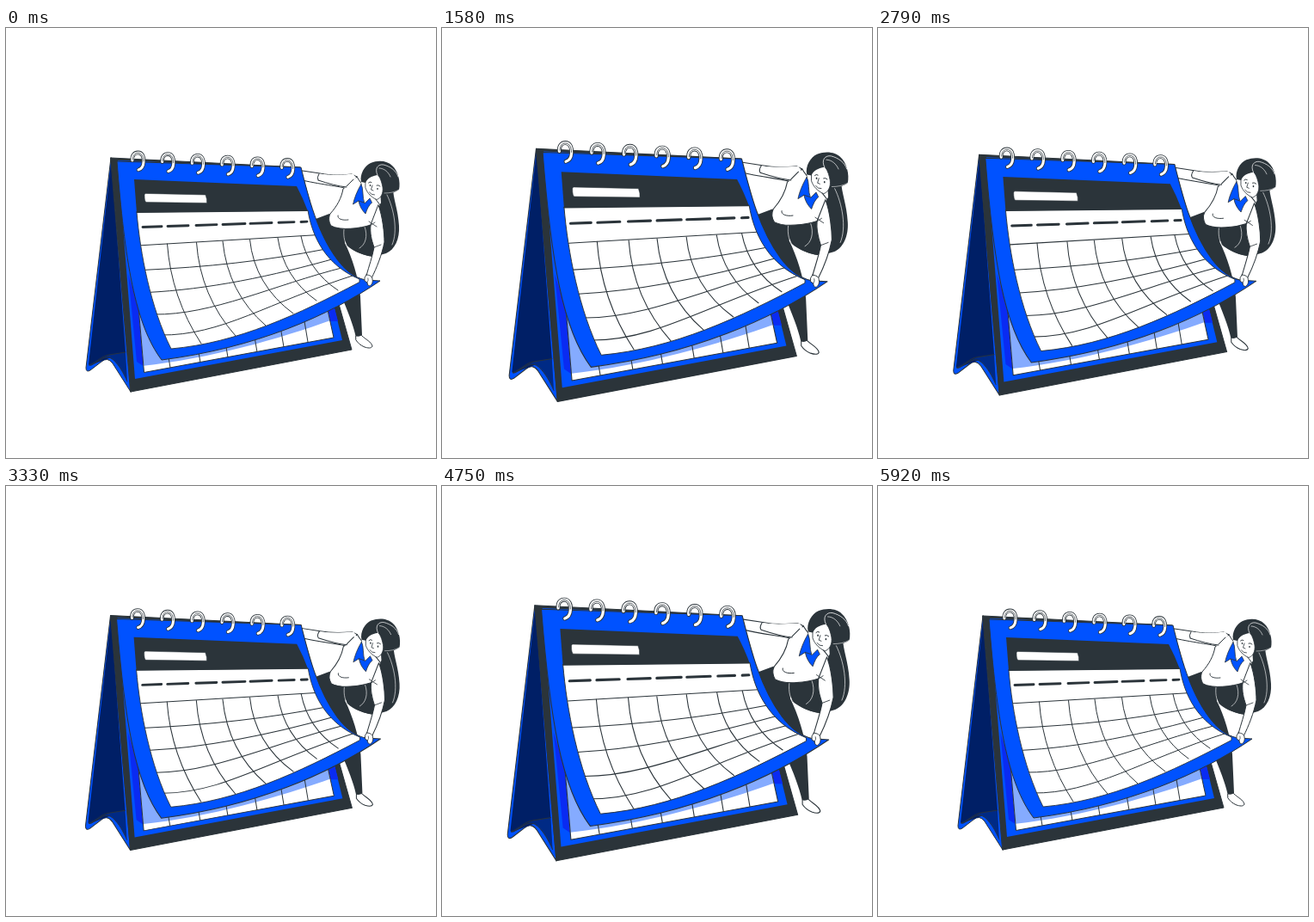
These frames come from a looping animation (500x500 px, 5.96 s). An HTML page with a canvas:

```html
<!DOCTYPE html>
<html lang="en">
<head>
<meta charset="utf-8">
<title>Desk calendar</title>
<style>
html, body { margin: 0; width: 100%; height: 100%; overflow: hidden; background: #fff; }
canvas { display: block; width: 500px; height: 500px; }
</style>
</head>
<body>
<canvas id="stage"></canvas>
<script>
const LOOP = 5960, FPS = 24;
const CENTER = [275.5, 283.5];
const BLUE = '#0052ff', DARK = '#2b343a', NAVY = '#001f66', FLOOR = '#002a85';
const PALE = '#85abff', DEEP = '#0a2bf2', WHITE = '#fff';

// time in ms, growth of the scene
const PULSE = [[0, 0], [1150, .1], [2500, .0425], [3400, 0], [3430, 0], [4650, .1], [5900, 0], [5960, 0]];

const canvas = document.getElementById('stage');
const ctx = canvas.getContext('2d');
const dpr = window.devicePixelRatio || 1;
canvas.width = canvas.height = 500 * dpr;

function scaleAt(t) {
  const i = PULSE.findIndex(p => p[0] > t);
  const [t0, a] = PULSE[i - 1], [t1, b] = PULSE[i];
  return 1 + a + (b - a) * (t - t0) / (t1 - t0);
}

function fill(d, color, line) {
  const p = new Path2D(d);
  ctx.fillStyle = color;
  ctx.fill(p);
  if (line) stroke(p, DARK, line);
}

function stroke(d, color = DARK, width = 1) {
  ctx.strokeStyle = color;
  ctx.lineWidth = width;
  ctx.stroke(d instanceof Path2D ? d : new Path2D(d));
}

function clipped(d, draw) {
  ctx.save();
  ctx.clip(new Path2D(d));
  draw();
  ctx.restore();
}

function drawWoman() {
  // hair behind the shoulders
  fill('M434 174 L450 186 C450 198 456 211 457 230 C458 245 452 258 442 262 L428 266 C408 264 396 254 391 242 L394 230 L424 226 L436 203 Z', DARK);
  stroke('M443 194 C451 210 456 236 449 252', WHITE, .6);

  // trousers and shoe
  fill('M407 358 C410 357 412 356 414 358 C418 362 425 365 426 370 C425 373 420 372 417 371 C412 369 409 366 407 363 Z', WHITE, 1);
  fill('M360 222 L376 216 L398 231 L394 250 C402 266 410 290 412 312 L414 357 Q410 360 406.5 358 C404 346 397 328 390 312 L370 260 Z', DARK);
  fill('M391 232 C402 229 414 229 425 229 L424 257 L428 266 C410 264 400 256 396 253 Z', DARK);
  stroke('M393 234 C392 243 394 251 398 255', WHITE, .6);
  stroke('M417 231 C421 242 418 252 411 256', WHITE, .6);

  // far arm and torso
  fill('M338 165 L365 169 C380 172 391 171 402 170 L408 173 L398 187 C388 184 365 182 340 176 Z', WHITE, 1);
  fill('M408 173 C414 184 428 195 435 206 C431 217 428 223 424 229 C412 233 389 236 378 230 C375 225 375 220 377 216 C385 207 390 198 392 187 C398 183 402 178 408 173 Z', WHITE, 1);
  fill('M364 169.5 C381 172 393 170 404 170 L407 175 L396 186 C386 184 374 180 363 177 Z', WHITE);
  stroke('M363 177 C375 181 386 184 396 185 M364 169.5 Q361 174 363 177 M396 184 L404 176');
  stroke('M386 218 C385 222 391 224 398 223', DARK, .9);

  // near arm
  fill('M433 206 C438 219 440 239 440 249 C437 264 431 279 425 291 L419 288 C422 277 426 266 428 255 C425 246 423 239 424 229 Z', WHITE, 1);
  stroke('M428 255 L436 252 M422 225 L431 231 M423 230 L429 226', DARK, .8);

  // neck, scarf, face
  fill('M415 176 L411 186 L417 202 L428 200 L430 190 Z', WHITE);
  fill('M413 181.5 C408 190 405 198 403.5 205 L410 201 C411 207 414 212 418 216 C420 210 422 206 425.5 203 L423 198 L417 204 C414 197 416 187 413 181.5 Z', BLUE, .8);
  stroke('M410 201 L416 203', DARK, .8);
  fill('M418 176 C420 170 428 168 433 171 C436 176 437 180 438 185 C439 192 436 198 431 199.5 C425 197 420 192 418 186 Z', WHITE, .8);
  stroke('M421.5 180 Q423 178 425 179.5 M431 183 Q433 182 435 184', DARK, .9);
  stroke('M426 183 L424.5 188 L427 189 M422.5 191 Q425 194.5 428.5 194', DARK, .8);
  fill('M422.7 183 a.8 1.1 0 1 0 1.6 0 a.8 1.1 0 1 0 -1.6 0 M431.2 187 a.8 1.1 0 1 0 1.6 0 a.8 1.1 0 1 0 -1.6 0', DARK);

  // hair and beret
  fill('M413 179 C411 170 417 160 424 157 C434 153 444 155 449 160 C456 166 459 179 457 188 C452 192 446 192 439 194 C440 184 437 176 432 171 C425 172 420 175 418 180 Z', DARK);
  stroke('M432 171 C428 163 433 158 439 159 C447 161 454 166 456 173', WHITE, .7);
  stroke('M434 163 C440 163 445 168 447 173', WHITE, .6);
  stroke('M440 192 C446 192 452 191 457 188', WHITE, .5);
}

function drawStand() {
  fill('M122 151 L93 395 Q93 401 98 398 L111 388 Q118 382 124 390 L145 423 Z', BLUE, 1);
  fill('M122.5 153 L96 391 Q97 394 101 391 L139 377 Z', NAVY);
  fill('M97 392 Q99 393 103 390 L113 384 Q119 381 125 386 C132 393 136 400 141 411 L139 377 L120 380 Q108 386 97 392 Z', FLOOR);
  stroke('M97 392 C106 388 112 381 120 380 L139 377', DARK, .9);
  stroke('M97 392 Q99 393 103 390 L113 384 Q119 381 125 386 C132 393 136 400 141 411', DARK, .9);
  fill('M122 151 L342 162 L402 374 L145 423 Z', DARK, 1);
  fill('M130 154 L342 163 L391 363 L150 408 Z', BLUE);
  fill('M142 286 L156 330 L159.5 393 L152 388 Z', DEEP);
  fill('M372 300 L381 322 L386 341 L376 341 Z', DEEP);

  // next month
  const sheet = 'M152 300 L160.5 400.5 L381 360 L371 314 Z';
  fill(sheet, WHITE);
  clipped(sheet, () => {
    fill('M140 290 L158 393 C240 384 320 361 386 337 L386 290 Z', PALE);
    [191, 226, 258, 292, 323, 351].forEach((x, i) => {
      const y = 395 - i * 6;
      stroke(`M${x - 6} ${y - 36} L${x + 1} ${y + 6}`);
    });
  });
  stroke(sheet);
}

function drawPage() {
  fill('M129 155 L343 162 C352 198 362 238 385 269 C394 281 404 290 418 293 L435 294 C375 335 290 372 181 386 C150 345 138 270 129 155 Z', BLUE, 1);
  const sheet = 'M152 214 L351 212 C356 243 372 276 411 292 L411 295.5 C340 333 270 366 192 373 C168 325 156 262 152 214 Z';
  fill(sheet, WHITE);
  clipped(sheet, () => {
    [
      [187.5, 251, 192, 313, 227, 367], [221.5, 249.5, 226, 312, 267, 358],
      [252, 248, 258, 308, 302, 346], [283.5, 246, 289, 299, 334, 332],
      [316, 244, 323, 290, 361, 317], [343, 242, 351, 282, 386, 305]
    ].forEach(([x, y, cx, cy, u, v]) => stroke(`M${x} ${y} Q${cx} ${cy} ${u} ${v}`));
    stroke('M153 253 L364 240.5');
    stroke('M158 281.5 C235 278 300 271 372 257');
    stroke('M164 307.5 C235 304 308 289 386 267');
    stroke('M172 333 C240 334 310 299 394 278');
    stroke('M180 357 C250 358 305 319 406 287');
  });
  stroke(sheet, DARK, .9);
  fill('M149 176 L338 184 Q345 197 351 213 L152 215 Z', DARK);
  fill('M162 192.4 L232 194 Q234 199 233.5 203.5 L163 202.6 Q161 202 161 194 Z', WHITE, .5);

  [[158, 182], [187, 213], [220, 246], [251, 279], [283, 310], [316, 336], [342, 351]].forEach(([a, b]) => {
    const y = x => 231.5 - (x - 158) * .033;
    stroke(`M${a + 1} ${y(a)} L${b - 1} ${y(b)}`, DARK, 2.9);
  });
}

function drawRings() {
  const ring = new Path2D('M-6.5 10 C-7 4 -4 1 0 1 C5 1 7.2 6 6.6 12 C6.3 17 4 20 .6 21');
  for (let i = 0; i < 6; i++) {
    ctx.save();
    ctx.translate(153.4 + i * 34.75, 143.9 + i * 1.7);
    stroke(ring, DARK, 4.6);
    stroke(ring, WHITE, 3);
    stroke('M-6 9 C-6 4 -3.5 1.3 0 1.3 C4.5 1.3 6.8 6 6.5 11', DARK, .7);
    ctx.restore();
  }
}

function drawHand() {
  fill('M419 287 C423 287 426 289 426 292 C427 296 425 299 423 300 Q420 300 420 296 L417 294 Q416 290 419 287 Z', WHITE, .9);
  stroke('M420 296 Q422 293 421 291', DARK, .7);
}

function draw(t) {
  const s = scaleAt(t);
  ctx.setTransform(dpr, 0, 0, dpr, 0, 0);
  ctx.fillStyle = WHITE;
  ctx.fillRect(0, 0, 500, 500);
  ctx.translate(...CENTER);
  ctx.scale(s, s);
  ctx.translate(-CENTER[0], -CENTER[1]);
  ctx.lineJoin = ctx.lineCap = 'round';
  drawWoman();
  drawStand();
  drawPage();
  drawRings();
  drawHand();
}

const start = performance.now();
function tick() {
  const t = (performance.now() - start) % LOOP;
  const step = Math.floor((t + 4) * FPS / 1000);
  draw(Math.min(step * 1000 / FPS, LOOP - 1));
  requestAnimationFrame(tick);
}
tick();
</script>
</body>
</html>
```
